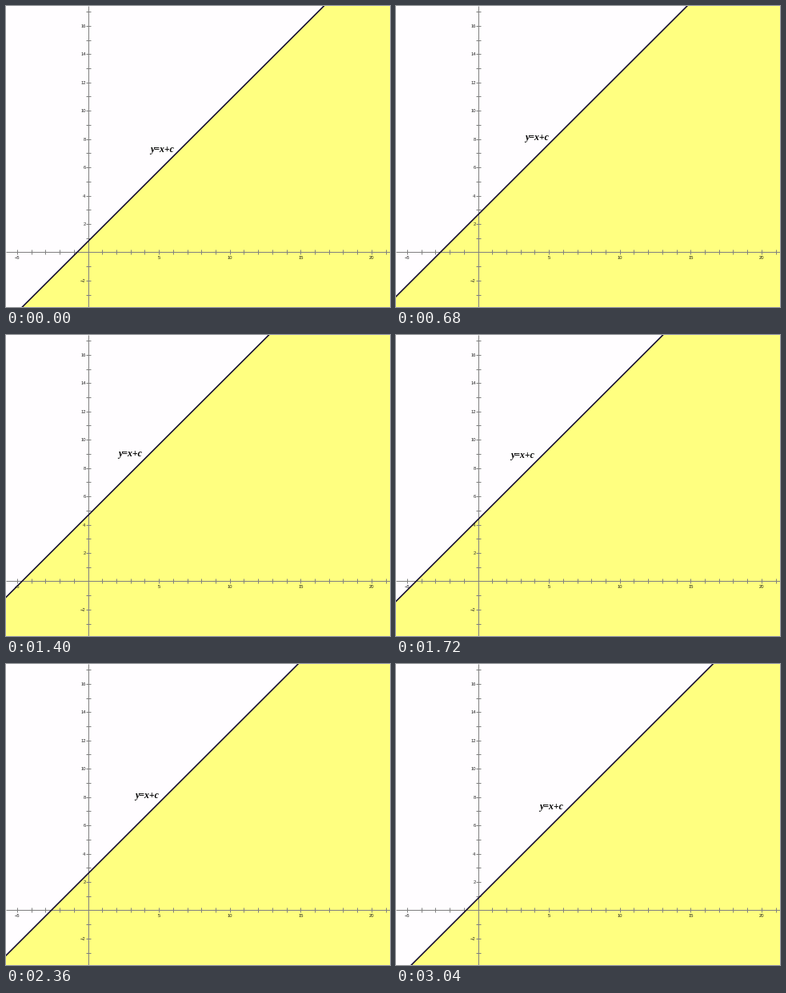
Animation, 480 px wide and 377 px high, one loop 3.08 s. Source, as a matplotlib script:

```python
import matplotlib.pyplot as plt
from matplotlib.animation import FuncAnimation

W, H, DPI = 480, 377, 64
UNIT = 17.72             # pixels per graph unit
OX, OY = 102.5, 308.4    # graph origin in pixels
FRAMES, PERIOD = 77, 75.4
C_MIN, C_STEP = 0.765, 0.111
GREY, INK = "#808080", "#120a30"


def pt(px):
    return px * 72 / DPI


def to_px(x, y):
    return OX + x * UNIT, OY - y * UNIT


fig = plt.figure(figsize=(W / DPI, H / DPI), dpi=DPI, facecolor="#fffdff")
ax = fig.add_axes([0, 0, 1, 1])
ax.set_xlim(0, W)
ax.set_ylim(H, 0)
ax.axis("off")


def segment(xs, ys):
    ax.plot(xs, ys, color=GREY, lw=pt(1), zorder=3,
            solid_capstyle="butt", snap=True)


def tick_text(x, y, n, ha):
    ax.text(x, y, str(n).replace("-", "\u2212"), ha=ha, va="center_baseline",
            family="Liberation Sans", size=pt(5.7), color="#202020", zorder=5)


def draw_axes():
    segment([0, W], [OY, OY])
    segment([OX, OX], [0, H])
    for n in range(-5, 22):
        x, _ = to_px(n, 0)
        if n:
            segment([x, x], [OY - 3, OY + 3])
            if n % 5 == 0:
                tick_text(x, OY + 6.4, n, "center")
    for n in range(-3, 18):
        _, y = to_px(0, n)
        if n:
            segment([OX - 3, OX + 3], [y, y])
            if n % 2 == 0:
                tick_text(OX - 3, y, n, "right")


draw_axes()
region, = ax.fill([0, 1, 1], [0, 0, 1], color="#ffff80", lw=0, zorder=1)
line, = ax.plot([], [], color=INK, lw=pt(1.6), zorder=4)
label = ax.text(0, 0, "y=x+c", ha="center", va="baseline", color="black",
                family="Liberation Serif", style="italic", weight="bold",
                size=pt(11.8), zorder=6)


def update(i):
    rise = C_STEP * min(i, abs(PERIOD - i))
    a = to_px(-10, C_MIN + rise - 10)
    b = to_px(25, C_MIN + rise + 25)
    region.set_xy([a, b, (b[0], a[1])])
    line.set_data(*zip(a, b))
    shift = rise * UNIT
    label.set_position((194.8 - 0.57 * shift, 182.8 - 0.45 * shift))
    return region, line, label


anim = FuncAnimation(fig, update, frames=FRAMES, interval=40,
                     repeat=True, repeat_delay=0)
plt.show()
```
